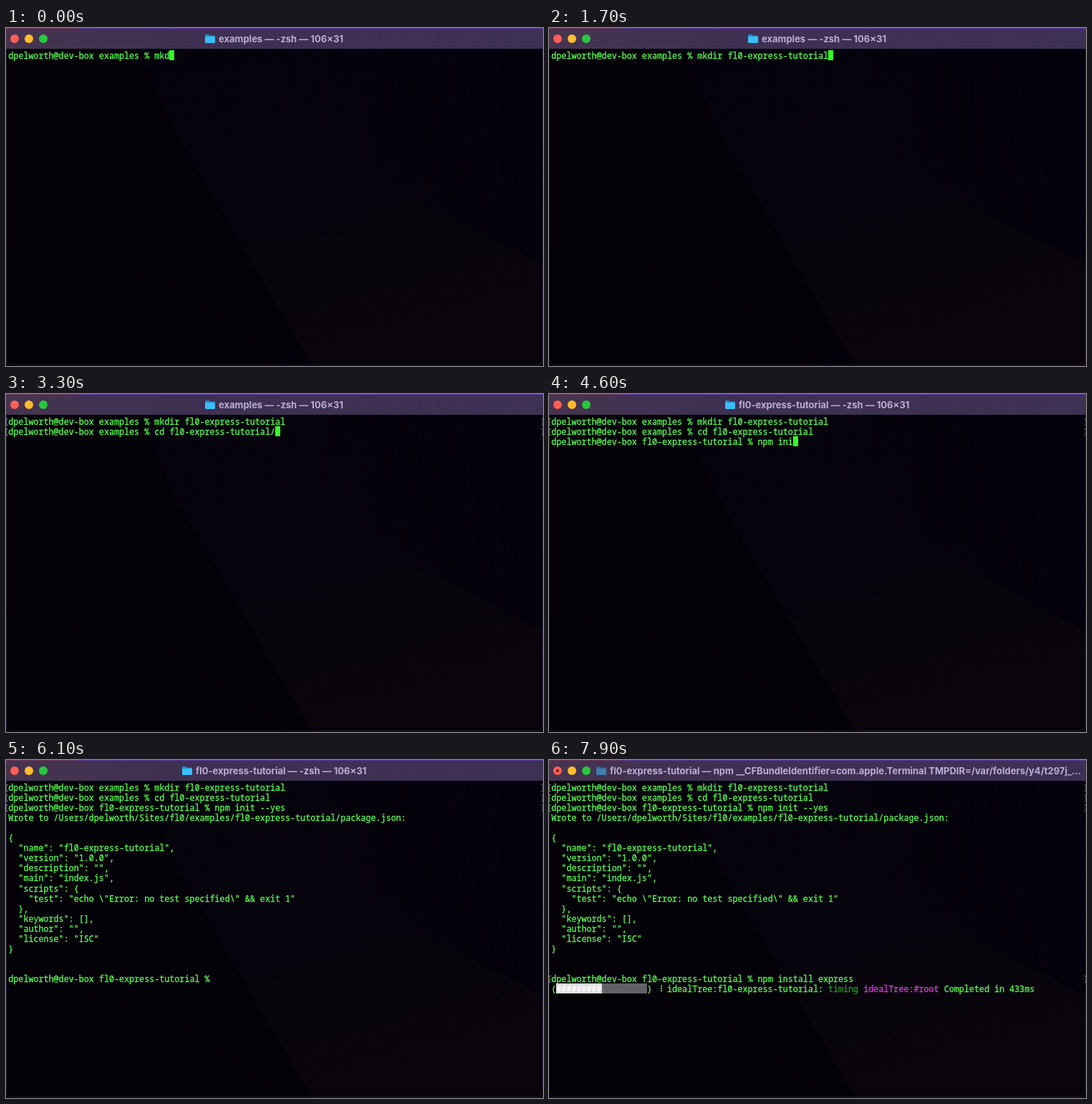
These frames come from a looping animation (750 by 472 pixels, 8000 ms). An HTML page:

```html
<!DOCTYPE html>
<html lang="en">
<head>
<meta charset="utf-8">
<title>Terminal</title>
<style>
html, body { margin: 0; width: 100%; height: 100%; overflow: hidden; background: #08060f; }
#window {
  position: relative; width: 750px; height: 472px; overflow: hidden; background: #030107;
}
#wall, #edge { position: absolute; left: 0; top: 0; }
#edge {
  width: 748px; height: 470px; border: 1px solid rgba(95, 75, 140, .3);
  border-top: 0; border-radius: 0 0 8px 8px;
}
#bar {
  position: absolute; left: 0; top: 0; width: 750px; height: 29px;
  background: linear-gradient(90deg, #46344f, #3f3052 30%, #3d3154);
}
#bar::before {
  content: ""; position: absolute; left: 0; top: 0; width: 100%; height: 1px;
  background: linear-gradient(90deg, #6d3457 0 90px, #5d37a5 110px);
}
.light { position: absolute; top: 9px; width: 12px; height: 12px; border-radius: 50%; }
#edited {
  position: absolute; left: 10px; top: 13px; width: 4px; height: 4px;
  border-radius: 50%; background: #7d1510;
}
#caption {
  position: absolute; top: 1px; height: 28px; display: flex; align-items: center; gap: 5px;
  white-space: pre; font: 700 13px Inter, sans-serif; color: #bbaed6;
}
#caption svg { flex: none; }
#screen {
  position: absolute; inset: 0; font: 11.72px "Noto Sans Mono", monospace;
  -webkit-text-stroke: .3px;
}
#screen span { position: absolute; height: 14px; line-height: 14px; white-space: pre; }
#screen .mark {
  box-sizing: border-box; width: 3px; height: 10px;
  border: 1px solid #73767d;
}
</style>
</head>
<body>
<div id="window">
  <svg id="wall" width="750" height="472">
    <defs>
      <linearGradient id="ray" x2=".35" y2="1">
        <stop stop-color="#04020b"/>
        <stop offset=".55" stop-color="#06030c"/>
        <stop offset="1" stop-color="#0a050b"/>
      </linearGradient>
      <linearGradient id="dusk">
        <stop offset=".4" stop-color="#03010c" stop-opacity="0"/>
        <stop offset="1" stop-color="#03010c"/>
      </linearGradient>
    </defs>
    <path d="M185 29L245 160L415 450L430 472H750V29Z" fill="url(#ray)"/>
    <path d="M185 29H750V330Z" fill="url(#dusk)"/>
    <path d="M0 305L215 350L390 472H0Z" fill="#020106"/>
  </svg>
  <div id="screen"></div>
  <div id="edge"></div>
  <div id="bar">
    <i class="light" style="left:6px;background:#ff5f57"></i>
    <i class="light" style="left:26px;background:#febc2e"></i>
    <i class="light" style="left:46px;background:#28c840"></i>
    <i id="edited"></i>
    <div id="caption">
      <svg width="14" height="12">
        <path d="M0 1.5Q0 0 1.5 0H5L6.5 1.5H12.5Q14 1.5 14 3V6H0Z" fill="#1b93cf"/>
        <rect y="3" width="14" height="9" rx="1.3" fill="#3cbdf5"/>
      </svg>
      <b></b>
    </div>
  </div>
</div>
<script>
const LOOP = 8000, STEP = 100;
const LEFT = 3.3, TOP = 31, COL = 7.03, ROW = 14.05;
const GREEN = '#5bff52', CURSOR = '#35fd27';

const project = 'fl0-express-tutorial';
const user = 'dpelworth';
const promptFor = dir => `${user}@dev-box ${dir} % `;
const home = promptFor('examples'), inside = promptFor(project);

const output = `Wrote to /Users/${user}/Sites/fl0/examples/${project}/package.json:

{
  "name": "${project}",
  "version": "1.0.0",
  "description": "",
  "main": "index.js",
  "scripts": {
    "test": "echo \\"Error: no test specified\\" && exit 1"
  },
  "keywords": [],
  "author": "",
  "license": "ISC"
}`.split('\n');

const screen = document.getElementById('screen');
const caption = document.getElementById('caption');
const edited = document.getElementById('edited');
const label = caption.querySelector('b'), folder = caption.querySelector('svg');

const rowTop = row => Math.round(TOP + row * ROW);

function put(row, col, text, color = GREEN, style = {}) {
  const el = document.createElement('span');
  el.textContent = text;
  Object.assign(el.style, {
    left: LEFT + col * COL + 'px', top: rowTop(row) + 'px', color, ...style
  });
  screen.append(el);
}

function block(row, col, cells, background, opacity = 1) {
  put(row, col, '', GREEN, { width: cells * COL + 'px', background, opacity });
}

function marks(row) {
  [[0, 'Right'], [747, 'Left']].forEach(([x, open]) => {
    const el = document.createElement('span');
    el.className = 'mark';
    el.style.cssText = `left:${x}px;top:${rowTop(row) + 3}px`;
    el.style['border' + open] = '0';
    if (x) el.style.opacity = .6;
    screen.append(el);
  });
}

// Part of a text typed evenly between two times.
function typed(text, t, from, to, start = 0) {
  const p = Math.min(1, Math.max(0, (t - from) / (to - from)));
  return text.slice(0, Math.floor(start + (text.length - start) * p + 1e-6));
}

function changeDir(t) {
  if (t >= 3400) return 'cd ' + project;
  if (t >= 2800) return `cd ${project}/`;
  return typed('cd ', t, 2100, 2400) + typed('fl', t, 2500, 2700);
}

function titleAt(t) {
  const env = '__CFBundleIdentifier=com.apple.Terminal';
  if (t >= 7600) return `${project} — npm ${env} TMPDIR=/var/folders/y4/t297j_…`;
  if (t >= 5200 && t < 5400) return `${project} — npm init --yes ${env} — 106×31`;
  return `${t < 3500 ? 'examples' : project} — -zsh — 106×31`;
}

function cursorAlpha(t) {
  const fade = (from, steps, until) =>
    t >= from && t < until ? Math.max(0, 1 - ((t - from) / STEP + 1) / steps) : 1;
  return fade(3900, 3, 4300) * fade(5600, 2, 6200);
}

function progress(t) {
  const done = t >= 7900, row = 20, filled = done ? 9 : 4;
  put(row, 0, '(');
  block(row, 1, filled, '#dcdcde');
  block(row, 1 + filled, 18 - filled, '#626166');
  put(row, 1, '#'.repeat(filled), '#fff');
  put(row, 1 + filled, '.'.repeat(18 - filled), '#747378');
  put(row, 19, ')');
  put(row, 21, done ? '⠸' : t >= 7800 ? '⠹' : '⠙');
  put(row, 23, `idealTree:${project}:`);
  put(row, 55, done ? 'timing' : 'sill', '#259b25');
  put(row, done ? 62 : 60, done ? 'idealTree:#root' : 'idealTree', '#dc3edb');
  put(row, done ? 78 : 70, done ? 'Completed in 433ms' : 'buildDeps');
}

function draw(t) {
  screen.textContent = '';
  let row, col;
  const line = (r, text) => { put(r, 0, text); row = r; col = text.length; };
  const newline = r => { row = r; col = 0; };

  line(0, home + typed('mkdir ' + project, t, 0, 1700, 3));
  if (t >= 2100) { marks(0); line(1, home + changeDir(t)); }
  if (t >= 2800) marks(1);
  if (t >= 3400) line(2, inside + typed('npm init --yes', t, 4200, 5000));
  if (t >= 5100) { marks(2); newline(3); }
  if (t >= 5300) { output.forEach((text, i) => put(3 + i, 0, text)); newline(18); }
  if (t >= 5400) line(19, inside + typed('npm install ', t, 6100, 6700) + typed('express', t, 6900, 7300));
  if (t >= 7500) { marks(19); newline(20); }
  if (t >= 7700) progress(t);
  else block(row, col, 1, CURSOR, cursorAlpha(t));

  const busy = t >= 7600 || t >= 5200 && t < 5400;
  label.textContent = titleAt(t);
  folder.style.opacity = busy ? .55 : 1;
  edited.style.opacity = busy ? 1 : 0;
  caption.style.left = Math.max(66, 374.5 - caption.offsetWidth / 2) + 'px';
}

let shown = -1;
function tick() {
  const t = Math.floor(performance.now() % LOOP / STEP) * STEP;
  if (t !== shown) draw(shown = t);
  requestAnimationFrame(tick);
}
tick();
</script>
</body>
</html>
```
